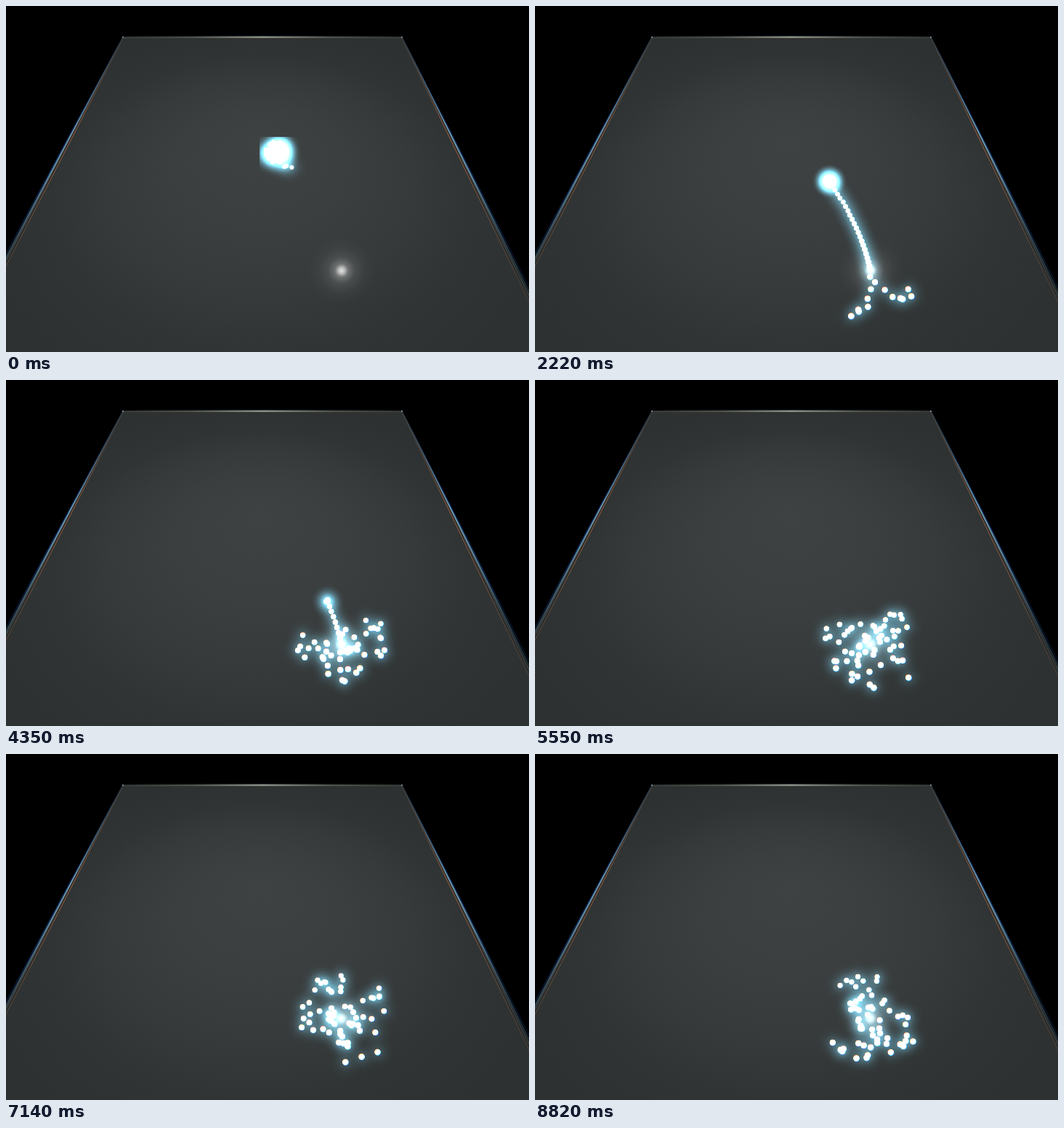
An HTML page with a canvas that plays this animation: 720 by 476 pixels, repeating every 8910 ms.

```html
<!DOCTYPE html>
<html lang="en">
<head>
<meta charset="utf-8">
<title>Particles and attractor</title>
<style>
html, body { margin: 0; width: 100%; height: 100%; overflow: hidden; background: #000; }
canvas { display: block; width: 720px; height: 476px; }
</style>
</head>
<body>
<canvas id="stage" width="720" height="476"></canvas>
<script>
const W = 720, H = 476, LOOP = 8910, STEP = 30, LAST = 8820;
const COUNT = 60, TRANSIT = 1.85, GLOW = 22, RAD = Math.PI / 180;
const well = { x: 462, y: 364 };
const ctx = document.getElementById('stage').getContext('2d');

function random(seed) {
  return () => {
    seed = (seed * 16807) % 2147483647;
    return seed / 2147483647;
  };
}
const rnd = random(4217);

function withStops(gradient, stops) {
  stops.forEach(([at, color]) => gradient.addColorStop(at, color));
  return gradient;
}

function line(c, x1, y1, x2, y2, width, style) {
  c.lineWidth = width;
  c.strokeStyle = style;
  c.beginPath();
  c.moveTo(x1, y1);
  c.lineTo(x2, y2);
  c.stroke();
}

// Lit from a point behind the middle, in perspective
function fillFloor(c) {
  c.beginPath();
  c.moveTo(161, 43);
  c.lineTo(545, 43);
  c.lineTo(760, 476);
  c.lineTo(-68, 476);
  c.closePath();
  c.save();
  c.translate(350, 0);
  c.scale(1.39, 1);
  c.fillStyle = withStops(c.createRadialGradient(0, 183, 0, 0, 305, 274), [
    [0, '#3e4243'], [.3, '#3b3f40'], [.55, '#363a3b'], [.75, '#303434'], [1, '#2d3131']
  ]);
  c.fill();
  c.restore();
}

// One side of the floor, its colours fanning apart towards the bottom
function sideEdge(c, x, slope, inward) {
  const strands = [[-2, '18,45,90', 2], [-.6, '125,180,205', 1.5], [.7, '90,95,95', 1.2], [1.8, '24,28,30', 1.2], [2.9, '135,88,62', 1.2]];
  for (const [shift, rgb, width] of strands) {
    const fade = withStops(c.createLinearGradient(0, 43, 0, 420), [
      [0, `rgba(${rgb},.15)`], [.15, `rgba(${rgb},.45)`], [.35, `rgba(${rgb},1)`],
      [.5, `rgba(${rgb},.9)`], [.75, `rgba(${rgb},.45)`], [1, `rgba(${rgb},.2)`]
    ]);
    line(c, x + inward * shift * .3, 43, x + slope * 433 + inward * shift * 2.4, 476, width, fade);
  }
}

function topEdge(c, y, rgb, width) {
  const fade = withStops(c.createLinearGradient(161, 0, 545, 0), [
    [0, `rgba(${rgb},.2)`], [.25, `rgba(${rgb},.45)`], [.5, `rgba(${rgb},1)`],
    [.75, `rgba(${rgb},.45)`], [1, `rgba(${rgb},.2)`]
  ]);
  line(c, 161, y, 545, y, width, fade);
}

function makeBackdrop() {
  const layer = document.createElement('canvas');
  layer.width = W;
  layer.height = H;
  const c = layer.getContext('2d');
  c.fillStyle = '#000';
  c.fillRect(0, 0, W, H);
  fillFloor(c);

  sideEdge(c, 161, -161 / 305, 1);
  sideEdge(c, 545, 175 / 352, -1);
  topEdge(c, 41.5, '60,75,90', 1);
  topEdge(c, 43, '140,145,130', 2);
  topEdge(c, 44.5, '60,55,45', 1);
  c.fillStyle = '#71818c';
  c.fillRect(160, 42, 2, 2);
  c.fillRect(544, 42, 2, 2);

  c.globalCompositeOperation = 'lighter';
  c.fillStyle = withStops(c.createRadialGradient(well.x, well.y, 0, well.x, well.y, 46), [
    [0, 'rgba(215,210,206,.8)'], [.09, 'rgba(215,210,206,.62)'], [.2, 'rgba(200,196,192,.28)'],
    [.4, 'rgba(180,176,172,.11)'], [.7, 'rgba(160,158,155,.03)'], [1, 'rgba(160,158,155,0)']
  ]);
  c.fillRect(well.x - 46, well.y - 46, 92, 92);
  return layer;
}

// Progress of the shrinking cluster along the shared path
const clusterAt = t => .12 * t + .0018 * t ** 3;

function bezier(u, a, b, c, d) {
  const v = 1 - u;
  return v * v * v * a + 3 * v * v * u * b + 3 * v * u * u * c + u * u * u * d;
}

const pathPoint = u => ({
  x: bezier(u, 372, 412, 448, well.x),
  y: bezier(u, 201, 245, 300, well.y)
});

const particles = Array.from({ length: COUNT }, (_, i) => {
  const release = -.35 + .05 * i + .00068 * i * i;
  const start = clusterAt(release);
  const early = i < 24;
  const turn = early ? (i % 2 ? 1 : -1) : (rnd() < .5 ? 1 : -1);
  const jitterAngle = rnd() * 2 * Math.PI, jitter = Math.sqrt(rnd());
  return {
    release, start, turn,
    arrival: release + TRANSIT * (1 - start),
    apex: (turn > 0 ? 114 : 29) + (rnd() - .5) * (i < 12 ? 8 : 36),
    reach: early ? 56 + 14 * rnd() : 16 + 54 * rnd() ** .6,
    minor: 6 + 11 * rnd(),
    half: 1.14 + .2 * rnd(),
    jx: jitter * Math.cos(jitterAngle),
    jy: jitter * Math.sin(jitterAngle)
  };
});

// Precessing ellipse around the well
function orbit(p, s) {
  const phase = Math.PI * s / p.half;
  const angle = (p.apex + p.turn * 38 * (s / p.half - .5)) * RAD;
  const along = p.reach * Math.sin(phase);
  const across = -p.turn * p.minor * Math.min(1, s / .3) * Math.cos(phase);
  const dx = along * Math.cos(angle) - across * Math.sin(angle);
  const dy = along * Math.sin(angle) + across * Math.cos(angle);
  return { x: well.x + dx, y: well.y + dy * (1 + dy * .0012) };
}

function locate(p, t) {
  if (t >= p.arrival) return orbit(p, t - p.arrival);
  const travel = Math.max(0, (t - p.release) / (p.arrival - p.release));
  const u = travel > 0 ? p.start + (1 - p.start) * travel : clusterAt(Math.max(t, 0));
  const spread = (13 * Math.exp(-t / .9) + 2) * (travel > 0 ? .5 * (1 - travel) ** 2 : 1);
  const at = pathPoint(u);
  return { x: at.x + p.jx * spread, y: at.y + p.jy * spread };
}

const glow = withStops(ctx.createRadialGradient(0, 0, 0, 0, 0, GLOW), [
  [0, 'rgba(95,200,235,.24)'], [.25, 'rgba(95,200,235,.125)'], [.5, 'rgba(95,200,235,.05)'],
  [.75, 'rgba(95,200,235,.014)'], [1, 'rgba(95,200,235,0)']
]);
const channels = [['#f00', -.0025], ['#0f0', 0], ['#00f', .0025]];

function drawParticle({ x, y }) {
  ctx.save();
  ctx.translate(x, y);
  ctx.fillStyle = glow;
  ctx.fillRect(-GLOW, -GLOW, 2 * GLOW, 2 * GLOW);
  ctx.restore();
  const r = 3.8 + (y - well.y) * .007;
  for (const [color, shift] of channels) {
    ctx.fillStyle = color;
    ctx.beginPath();
    ctx.arc(x + (x - 360) * shift, y + (y - 238) * shift, r, 0, 2 * Math.PI);
    ctx.fill();
  }
}

const backdrop = makeBackdrop();

function draw(ms) {
  const t = Math.min(LAST, Math.floor(ms / STEP) * STEP) / 1000;
  ctx.globalCompositeOperation = 'source-over';
  ctx.drawImage(backdrop, 0, 0);
  ctx.save();
  ctx.beginPath();
  ctx.rect(349, 180, W - 349, H - 180);
  ctx.clip();
  ctx.globalCompositeOperation = 'lighter';
  particles.forEach(p => drawParticle(locate(p, t)));
  ctx.restore();
}

const began = performance.now();
function tick() {
  draw((performance.now() - began) % LOOP);
  requestAnimationFrame(tick);
}
tick();
</script>
</body>
</html>
```
